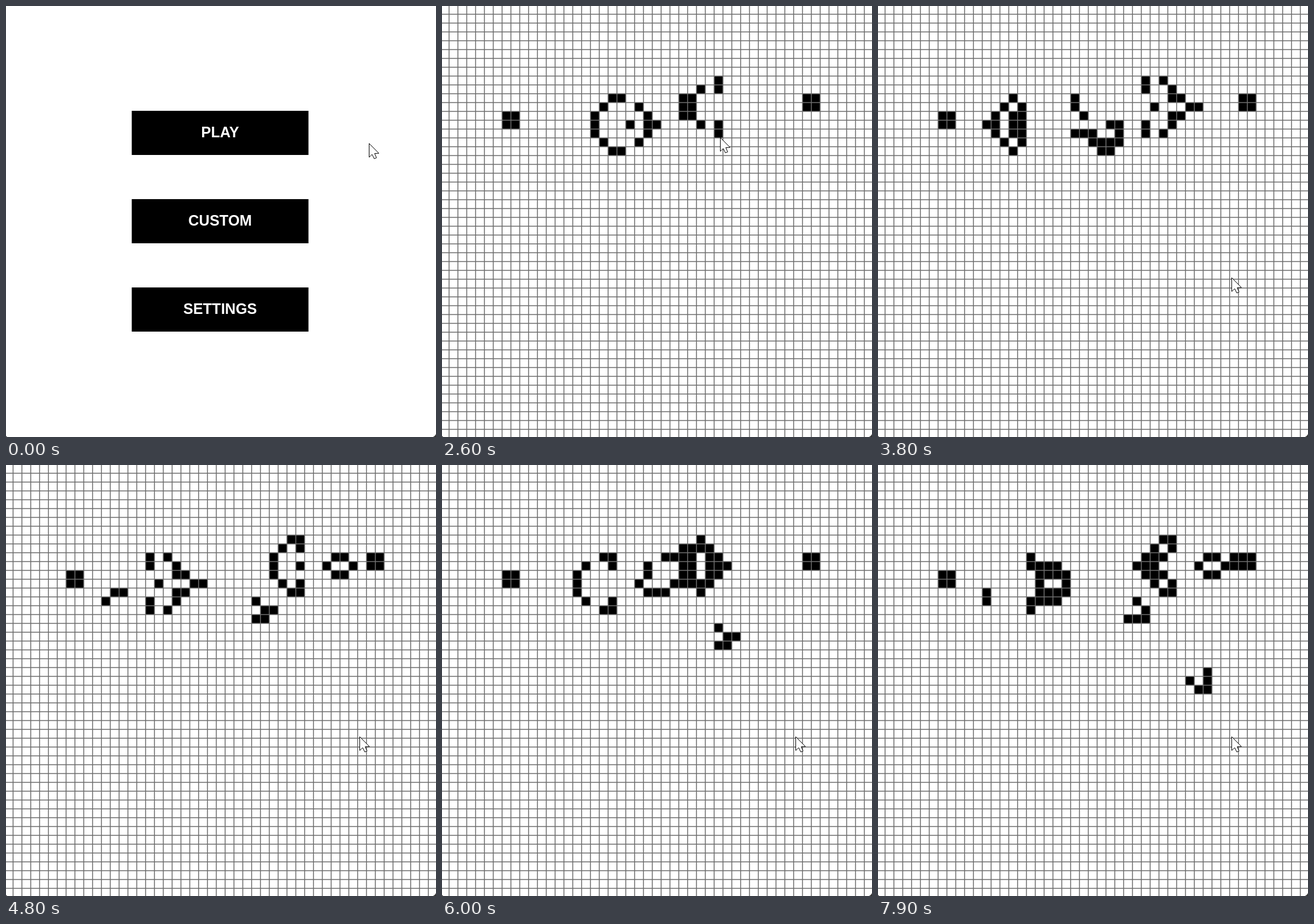
Write an HTML page with a canvas that moves like this. It is 730 px wide and 732 px high and loops after 8000 ms.

```html
<!DOCTYPE html>
<html lang="en">
<head>
<meta charset="utf-8">
<title>Game of Life</title>
<style>
  html, body { margin: 0; width: 730px; height: 732px; overflow: hidden; background: #fff; }
  canvas { display: block; }
</style>
</head>
<body>
<canvas id="stage" width="730" height="732"></canvas>
<script>
const W = 730, H = 732, LOOP = 8000, TICK = 100;
const GRID_AT = 2500, RUN_AT = 2600, SLOW_AT = 6300;
const CELL = 15, LEFT = -3, TOP = -1, SIZE = 50;
const ctx = document.getElementById("stage").getContext("2d");

const BUTTON = { x: 213.5, w: 300, h: 75 };
const MENU = [["PLAY", 178], ["CUSTOM", 328], ["SETTINGS", 478]];

const GUN = [
  "........................O",
  "......................O.O",
  "............OO......OO............OO",
  "...........O...O....OO............OO",
  "OO........O.....O...OO",
  "OO........O...O.OO....O.O",
  "..........O.....O.......O",
  "...........O...O",
  "............OO"
];
const GUN_COL = 7, GUN_ROW = 8;

// time, x, y of the pointer tip
const PATH = [
  [0, 616, 233], [300, 575, 222], [600, 505, 212], [900, 470, 207],
  [1500, 470, 207], [1700, 560, 165], [1800, 575, 142], [1900, 563, 130],
  [2000, 550, 126], [2200, 505, 170], [2400, 475, 215], [2600, 472, 223],
  [3000, 530, 345], [3400, 600, 461], [LOOP, 600, 461]
];

const ARROW = [[0.5, 0.5], [0.5, 24], [5.5, 19], [9, 26.3], [13, 24.8], [9.8, 17.5], [17, 17.2]];

function seed() {
  const cells = new Uint8Array(SIZE * SIZE);
  GUN.forEach((line, r) => [...line].forEach((ch, c) => {
    if (ch === "O") cells[(r + GUN_ROW) * SIZE + c + GUN_COL] = 1;
  }));
  return cells;
}

function evolve(cells) {
  const at = (r, c) => r >= 0 && c >= 0 && r < SIZE && c < SIZE ? cells[r * SIZE + c] : 0;
  return cells.map((alive, i) => {
    const r = Math.floor(i / SIZE), c = i % SIZE;
    let n = -alive;
    for (let dr = -1; dr <= 1; dr++)
      for (let dc = -1; dc <= 1; dc++) n += at(r + dr, c + dc);
    return n === 3 || (alive && n === 2) ? 1 : 0;
  });
}

const generations = [seed()];
while (generations.length < 56) generations.push(evolve(generations[generations.length - 1]));

function generationAt(t) {
  if (t >= SLOW_AT) t = SLOW_AT + Math.floor((t - SLOW_AT) / (2 * TICK)) * 2 * TICK;
  return Math.max(0, Math.floor((t - RUN_AT) / TICK));
}

function pointerAt(t) {
  const i = PATH.findIndex(p => p[0] > t);
  const [t0, x0, y0] = PATH[i - 1], [t1, x1, y1] = PATH[i];
  const k = (t - t0) / (t1 - t0);
  return [Math.round(x0 + (x1 - x0) * k), Math.round(y0 + (y1 - y0) * k)];
}

function drawMenu([px, py]) {
  ctx.font = 'bold 25px "Liberation Sans", Arial, sans-serif';
  ctx.textAlign = "center";
  ctx.textBaseline = "alphabetic";
  for (const [label, y] of MENU) {
    const over = px >= BUTTON.x && px < BUTTON.x + BUTTON.w && py >= y && py < y + BUTTON.h;
    ctx.fillStyle = over ? "#404040" : "#000";
    ctx.fillRect(BUTTON.x, y, BUTTON.w, BUTTON.h);
    ctx.fillStyle = "#fff";
    ctx.fillText(label, BUTTON.x + BUTTON.w / 2, y + 45);
  }
}

function drawBoard(cells) {
  ctx.fillStyle = "#000";
  cells.forEach((alive, i) => {
    if (alive) ctx.fillRect(LEFT + (i % SIZE) * CELL, TOP + Math.floor(i / SIZE) * CELL, CELL, CELL);
  });
  ctx.strokeStyle = "#6e6e6e";
  ctx.lineWidth = 1.5;
  ctx.beginPath();
  for (let x = LEFT + CELL; x < W; x += CELL) { ctx.moveTo(x, 0); ctx.lineTo(x, H); }
  for (let y = TOP + CELL; y < H; y += CELL) { ctx.moveTo(0, y); ctx.lineTo(W, y); }
  ctx.stroke();
}

function drawCorners() {
  ctx.fillStyle = "#333";
  ctx.beginPath();
  ctx.moveTo(W, H - 5);
  ctx.quadraticCurveTo(W - 1.5, H - 1.5, W - 5, H);
  ctx.lineTo(W, H);
  ctx.moveTo(0, H - 2);
  ctx.lineTo(2, H);
  ctx.lineTo(0, H);
  ctx.fill();
}

function drawPointer([x, y]) {
  ctx.beginPath();
  for (const [dx, dy] of ARROW) ctx.lineTo(x + dx, y + dy);
  ctx.closePath();
  ctx.fillStyle = "#fff";
  ctx.fill();
  ctx.strokeStyle = "#000";
  ctx.lineWidth = 1;
  ctx.stroke();
}

function render(time) {
  const t = Math.floor((time % LOOP) / TICK) * TICK;
  const pointer = pointerAt(t);
  ctx.fillStyle = "#fff";
  ctx.fillRect(0, 0, W, H);
  if (t < GRID_AT) drawMenu(pointer);
  else drawBoard(generations[generationAt(t)]);
  drawCorners();
  drawPointer(pointer);
}

const start = performance.now();
function loop() {
  render(performance.now() - start);
  requestAnimationFrame(loop);
}
loop();
</script>
</body>
</html>
```
